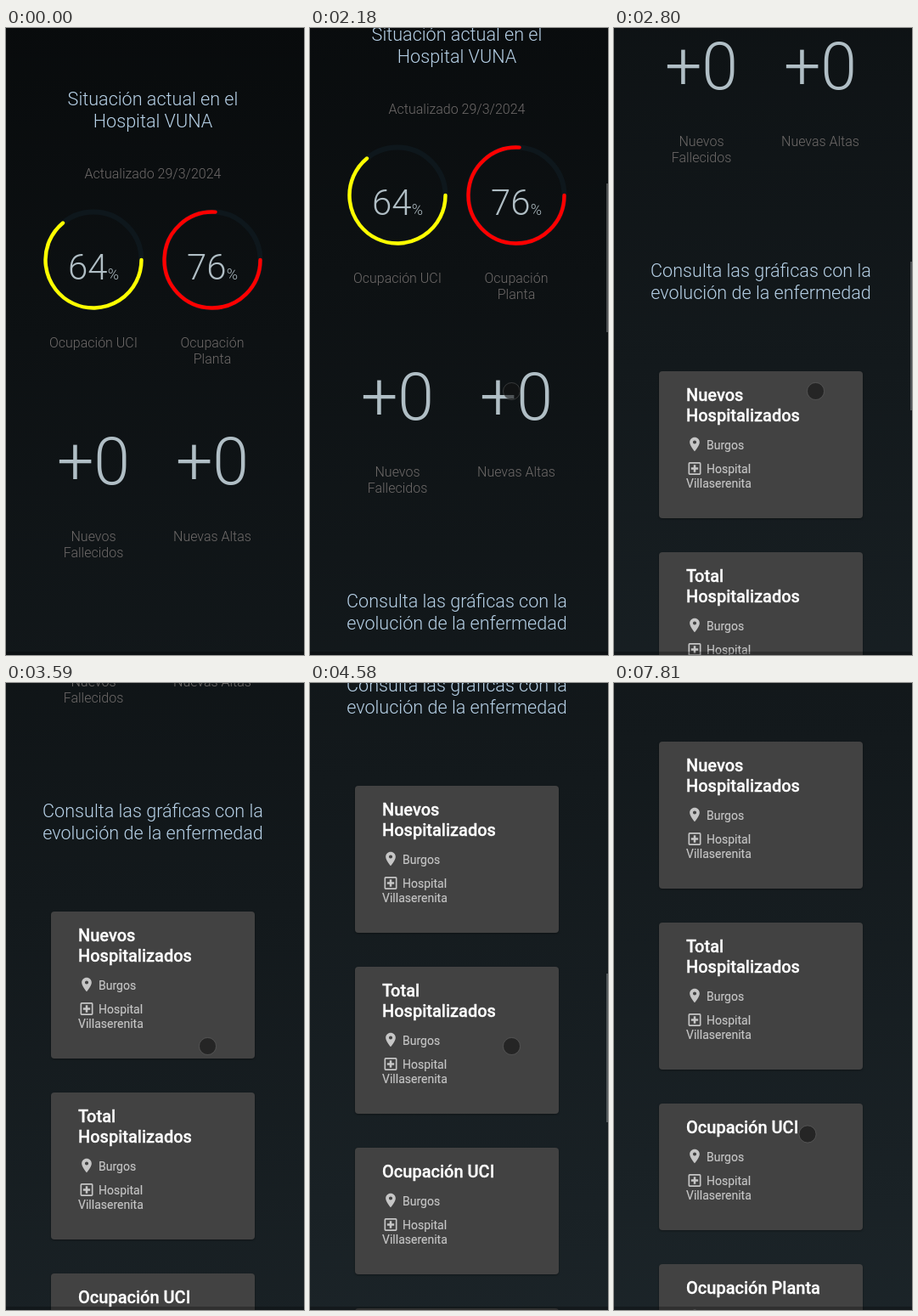
An HTML page for the animation above (8 s loop, 351 by 738 pixels).

```html
<!DOCTYPE html>
<html lang="es">
<head>
<meta charset="utf-8">
<style>
html, body { margin: 0; width: 100%; height: 100%; overflow: hidden; background: #090c0d; }
svg { display: block; width: 351px; height: 738px; font-family: Roboto, sans-serif; }
text { text-anchor: middle; font-weight: 300; }
.head { font-size: 21.6px; fill: #b6d0e6; }
.label { font-size: 16px; fill: #6e6a69; }
.big { font-size: 77px; fill: #b0bec5; }
.rate { font-size: 42px; fill: #b0bec5; }
.unit { font-size: 18px; }
.arc { fill: none; stroke-width: 4.4; stroke-linecap: round; }
.track { fill: none; stroke: #0e171c; stroke-width: 6; }
.card { fill: #424242; filter: drop-shadow(0 1px 1px rgba(0, 0, 0, .35)); }
.card-title, .info { text-anchor: start; }
.card-title { font-size: 20px; font-weight: 500; fill: #fff; stroke: #fff; stroke-width: .3; }
.info { font-size: 14px; font-weight: 400; fill: #c6c6c6; stroke: #c6c6c6; stroke-width: .15; }
.icon { fill: #c6c6c6; fill-rule: evenodd; }
</style>
</head>
<body>
<svg viewBox="0 0 351 738">
  <defs>
    <linearGradient id="night" x2="0" y2="1">
      <stop stop-color="#000"/>
      <stop offset="1" stop-color="#263238"/>
    </linearGradient>
  </defs>
  <g id="page"></g>
  <rect y="734" width="351" height="4" fill="#000" fill-opacity=".28"/>
  <rect id="bar" x="349" width="2" height="175" fill="#fff" fill-opacity=".26"/>
  <circle id="cursor" r="10" fill="rgba(20,20,20,.62)" stroke="rgba(140,140,140,.32)"/>
</svg>
<script>
const $ = id => document.getElementById(id);

const PIN = 'M12 2C8.13 2 5 5.13 5 9c0 5.25 7 13 7 13s7-7.75 7-13c0-3.87-3.13-7-7-7z' +
  'm0 9.5a2.5 2.5 0 0 1 0-5a2.5 2.5 0 0 1 0 5z';
const CLINIC = 'M19 3H5a2 2 0 0 0-2 2v14a2 2 0 0 0 2 2h14a2 2 0 0 0 2-2V5a2 2 0 0 0-2-2z' +
  'm0 16H5V5h14zm-8.5-2h3v-3.5H17v-3h-3.5V7h-3v3.5H7v3h3.5z';

const text = (cls, x, y, lines, step = 0) => [].concat(lines)
  .map((line, i) => `<text class="${cls}" x="${x}" y="${y + i * step}">${line}</text>`).join('');

const icon = (path, y) =>
  `<path class="icon" transform="translate(85 ${y}) scale(${20 / 24})" d="${path}"/>`;

// One column of the dashboard: a ring with its rate, then a counter.
function column(x, percent, color, rateLabel, countLabel) {
  const r = 56.5, y = 273, a = percent / 50 * Math.PI;
  const end = `${x + r * Math.cos(a)} ${y + r * Math.sin(a)}`;
  return `<circle class="track" cx="${x}" cy="${y}" r="${r}"/>
    <path class="arc" stroke="${color}" d="M${x + r} ${y}A${r} ${r} 0 1 1 ${end}"/>` +
    text('rate', x, 296, `${percent}<tspan class="unit">%</tspan>`) +
    text('label', x, 376, rateLabel, 19) +
    text('big', x, 537, '+0') +
    text('label', x, 604, countLabel, 19);
}

function cards(top, titles) {
  return titles.map(title => {
    const y = top, extra = (title.length - 1) * 24, base = y + extra, height = 149 + extra;
    top += height + 40;
    return `<rect class="card" x="53" y="${y}" width="240" height="${height}" rx="4"/>` +
      text('card-title', 85, y + 35, title, 24) +
      icon(PIN, base + 52) + text('info', 109, base + 68, 'Burgos') +
      icon(CLINIC, base + 80.5) + text('info', 109, base + 96, 'Hospital') +
      text('info', 85, base + 113, 'Villaserenita');
  }).join('');
}

$('page').innerHTML =
  '<rect y="-692" width="351" height="3110" fill="url(#night)"/>' +
  text('head', 173, 91, ['Situación actual en el', 'Hospital VUNA'], 26) +
  text('label', 173, 177, 'Actualizado 29/3/2024') +
  column(103, 64, '#ff0', 'Ocupación UCI', ['Nuevos', 'Fallecidos']) +
  column(243, 76, '#f00', ['Ocupación', 'Planta'], 'Nuevas Altas') +
  text('head', 173, 758, ['Consulta las gráficas con la', 'evolución de la enfermedad'], 26) +
  cards(869, [['Nuevos', 'Hospitalizados'], ['Total', 'Hospitalizados'],
    ['Ocupación UCI'], ['Ocupación Planta']]);

const clamp = v => Math.min(1, Math.max(0, v));
const progress = (t, from, to) => clamp((t - from) / (to - from));
const glide = (t, from, to) => progress(t, from, to) ** 1.0525;

// The scrollbar stays while scrolling and fades out 600 ms after it ends.
const barAlpha = (t, from, to) => t < from ? 0 : clamp((to + 600 - t) / 400);

function draw(now) {
  // The screen refreshes five times a second.
  const t = Math.floor((now % 8000 + 20) / 200) * 200;

  const scroll = Math.round(600 * glide(t, 2070, 3000) +
    100 * glide(t, 4190, 4400) + 100 * glide(t, 4400, 4800));
  $('page').setAttribute('transform', `translate(0 ${-scroll})`);
  $('bar').setAttribute('y', Math.round(164.5 + scroll * .2373));
  $('bar').setAttribute('opacity', Math.max(barAlpha(t, 2070, 3000), barAlpha(t, 4190, 4800)));

  // The pointer swings up to its resting place, later drops to the third card.
  const u = progress(t, 600, 1800), drop = glide(t, 7590, 7800);
  const x = 237.5 + 52 * Math.cos(6 * Math.PI * u) * (1 - u) ** 5 - 9.5 * drop;
  const y = 427.5 + 264 * (1 - u) ** 2.4 + 103.5 * drop;
  $('cursor').setAttribute('transform', `translate(${x} ${y})`);
  $('cursor').setAttribute('opacity', t < 600 ? 0 : 1);
}

const start = performance.now();
function tick() {
  draw(performance.now() - start);
  requestAnimationFrame(tick);
}
tick();
</script>
</body>
</html>
```
